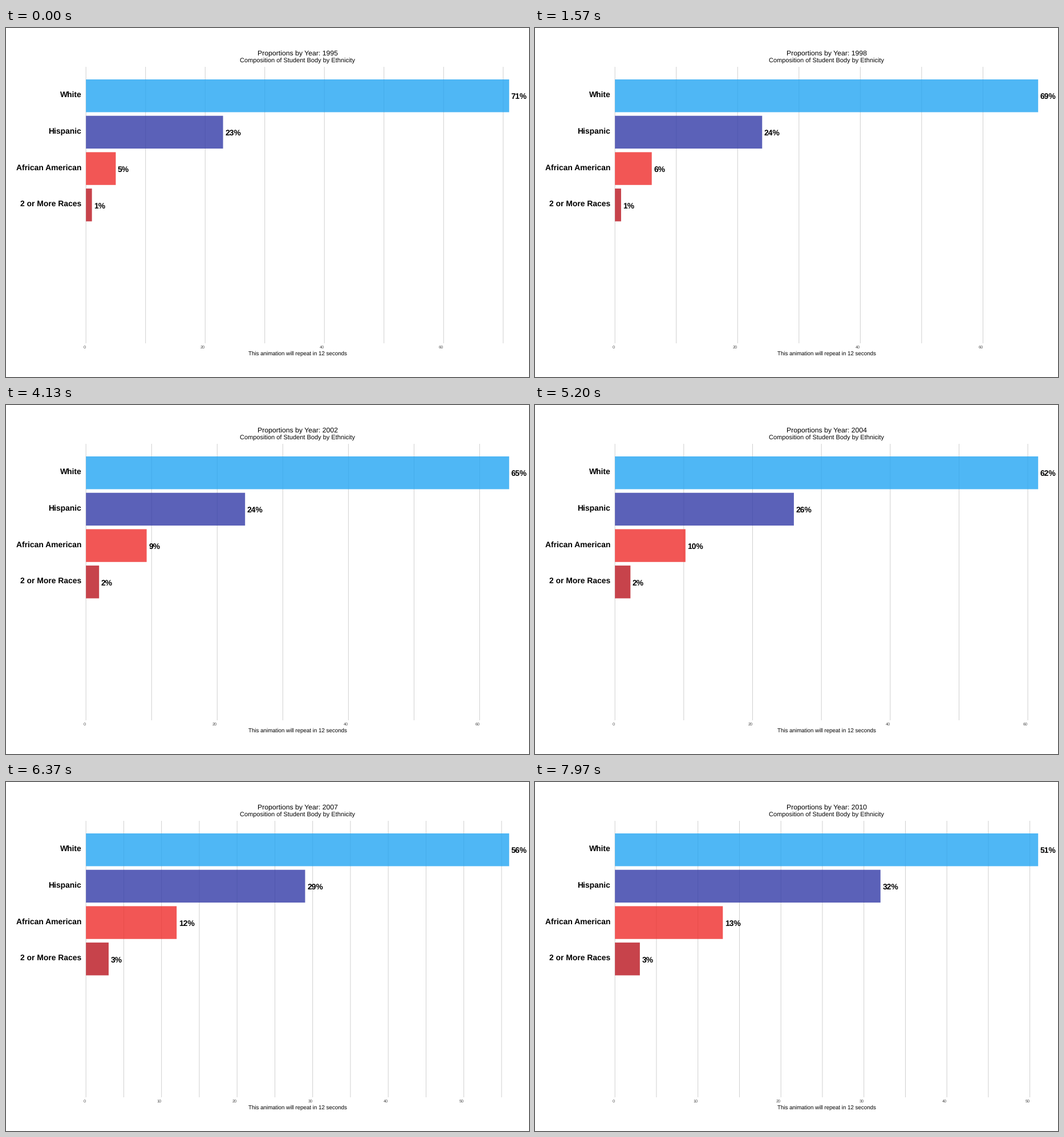
A matplotlib script that plays this animation: 917 by 611 pixels, repeating every 8000 ms.

```python
import numpy as np
import matplotlib.pyplot as plt
from matplotlib.animation import FuncAnimation
from matplotlib.collections import LineCollection
from matplotlib.patches import Rectangle

plt.rcParams["font.family"] = "Liberation Sans"
plt.rcParams["text.hinting"] = "none"

WIDTH, HEIGHT, DPI = 917, 611, 72  # at 72 dpi one point is one pixel
INTERVAL, LOOP_MS = 20, 8000
STEP_MS = 100 / 3                  # the chart itself moves at 30 steps a second
PERIOD, MOVE, LEAD = 16, 4, 5      # steps per year, moving steps, initial offset
FIRST_YEAR = 1995

X0, SPAN = 140.2, 742              # zero line and length of the longest bar
BAR_TOP, BAR_PITCH, BAR_HEIGHT = 90, 63.7, 57.4
GRID_TOP, GRID_BOTTOM = 68, 552

# Percentages at a few turning points; years between follow straight trends
KEY_YEARS = (1995, 1997, 2000, 2005, 2009, 2010)
GROUPS = [
    ("White", "#23a5f3", (71, 68.9, 68.2, 60, 52.4, 51)),
    ("Hispanic", "#323aa7", (23, 25.4, 22.6, 26.4, 30.9, 32)),
    ("African American", "#ef2c2a", (5, 5.2, 7.8, 10.9, 12.8, 13)),
    ("2 or More Races", "#b9141e", (1, 1, 1.6, 2.6, 3.9, 3)),
]

fig = plt.figure(figsize=(WIDTH / DPI, HEIGHT / DPI), dpi=DPI, facecolor="white")
ax = fig.add_axes([0, 0, 1, 1])
ax.set_xlim(0, WIDTH)
ax.set_ylim(HEIGHT, 0)
ax.axis("off")


def label(x, y, text, size, align="center", **style):
    return ax.text(x, y, text, fontsize=size, ha=align, va="baseline", **style)


def shares_in(year):
    return np.array([round(np.interp(year, KEY_YEARS, trend))
                     for _, _, trend in GROUPS])


title = label(511, 49, "", 12.25)
label(511, 61, "Composition of Student Body by Ethnicity", 11.05)
label(511.2, 573, "This animation will repeat in 12 seconds", 9.8)

grid = LineCollection([], colors="#cbcbcb", linewidths=0.9, zorder=1)
grid.set_snap(False)
ax.add_collection(grid)
ticks = [label(0, 561, "", 7.4, "right", color="#4d4d4d") for _ in range(7)]

bars, values = [], []
for row, (name, color, _) in enumerate(GROUPS):
    top = BAR_TOP + row * BAR_PITCH
    bar = Rectangle((X0, top), 0, BAR_HEIGHT, facecolor=color, alpha=0.8,
                    linewidth=0, snap=False, zorder=2)
    bars.append(ax.add_patch(bar))
    label(132.3, top + 31.2, name, 13.9, "right", weight="bold")
    values.append(label(0, top + 34.3, "", 13.9, "left", weight="bold"))


def update(frame):
    step = int((frame + 0.75) * INTERVAL / STEP_MS)
    index, phase = divmod(step + LEAD, PERIOD)
    progress = min(phase / MOVE, 1)
    year = FIRST_YEAR + index
    before, after = shares_in(year - 1), shares_in(year)
    shares = before + (after - before) * progress
    switched = progress >= 0.5
    shown = after if switched else before
    title.set_text(f"Proportions by Year: {year if switched else year - 1}")

    # The axis always ends at the longest bar
    longest = shares.max()
    scale = SPAN / longest
    for bar, value, share, number in zip(bars, values, shares, shown):
        bar.set_width(share * scale)
        value.set_x(X0 + share * scale + 3.6)
        value.set_text(f"{number}%")

    spacing = 20 if longest > 60.7 else 10
    xs = X0 + np.arange(0, longest + 1e-6, spacing / 2) * scale
    grid.set_segments([[(x, GRID_TOP), (x, GRID_BOTTOM)] for x in xs])
    for i, tick in enumerate(ticks):
        tick.set_visible(i * spacing <= longest + 1e-6)
        tick.set_x(X0 + i * spacing * scale)
        tick.set_text(str(i * spacing))
    return [title, grid, *ticks, *bars, *values]


anim = FuncAnimation(fig, update, frames=LOOP_MS // INTERVAL, interval=INTERVAL,
                     repeat=True, repeat_delay=0, cache_frame_data=False)
plt.show()
```
